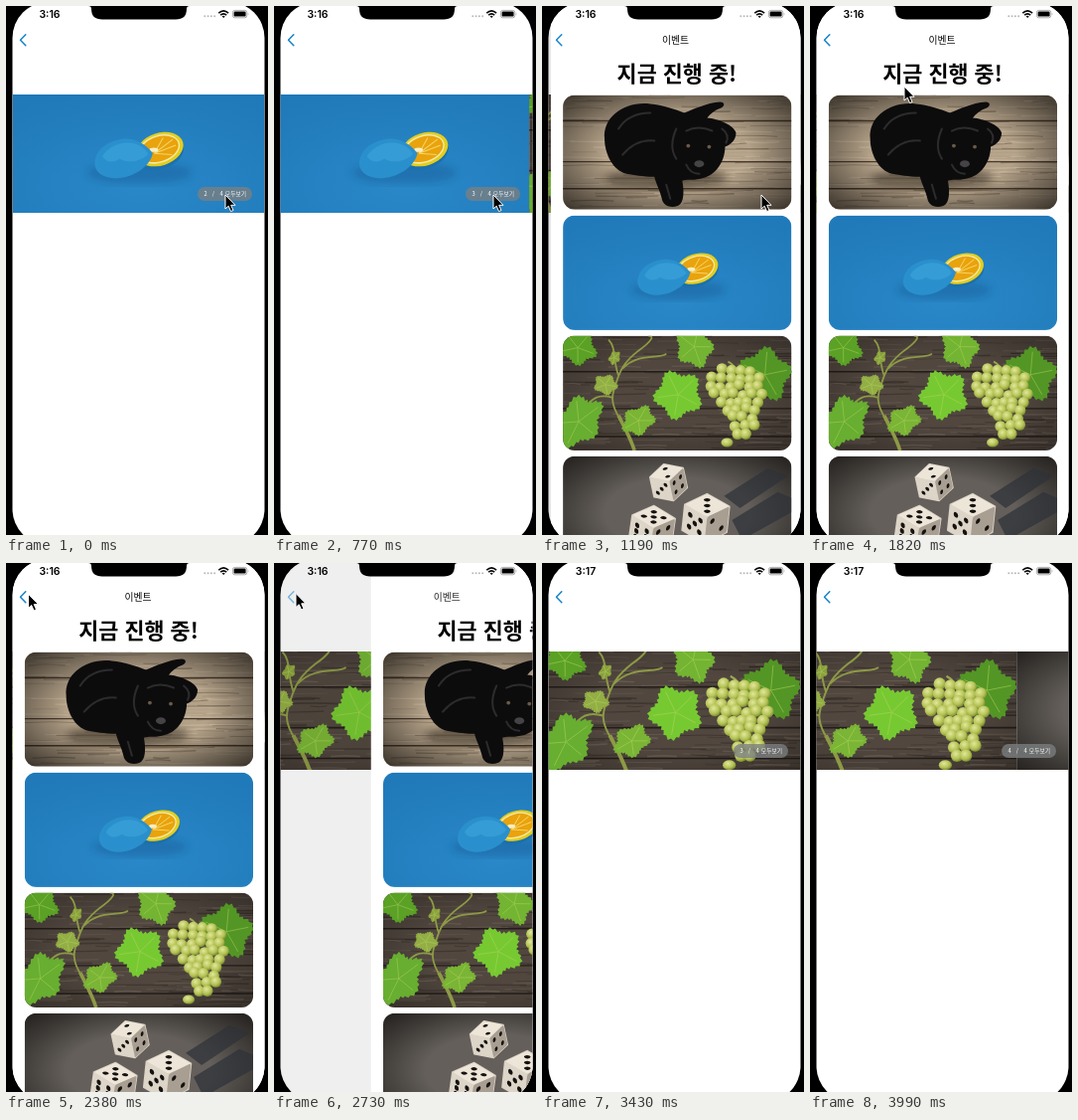
Animation of 264x532 px, one loop 4060 ms. Source, as an HTML page:

```html
<!DOCTYPE html>
<html lang="ko">
<head>
<meta charset="utf-8">
<title>Event carousel</title>
<style>
html, body { margin: 0; width: 100%; height: 100%; overflow: hidden; background: #000; }
svg { display: block; width: 100vw; height: 100vh; }
text { font-family: 'Noto Sans CJK KR', 'Noto Sans CJK', 'Noto Sans', sans-serif; text-anchor: middle; }
.clock { font: 600 10.5px Inter, sans-serif; }
</style>
</head>
<body>
<svg id="stage" viewBox="0 0 264 532" preserveAspectRatio="none"></svg>
<script>
const LOOP = 4060, STEP = 70, W = 254;
const stage = document.getElementById('stage');

let seed = 7;
const rnd = (a = 0, b = 1) => {
  seed = (seed * 16807) % 2147483647;
  return a + (b - a) * seed / 2147483647;
};
const repeat = (n, fn) => Array.from({ length: n }, (_, i) => fn(i)).join('');
const f1 = v => v.toFixed(1);

// Photo pieces, drawn in a 230 x 115 box
const photo = (id, body) => `<symbol id="${id}" viewBox="0 0 230 115" preserveAspectRatio="xMidYMid slice">${body}</symbol>`;

function wood(base, dark, light, gaps) {
  return `<rect width="230" height="115" fill="${base}"/>` +
    repeat(150, () => {
      const x = rnd(-30, 220), y = rnd(0, 115), l = rnd(15, 70);
      return `<path d="M${f1(x)} ${f1(y)}q${f1(l / 2)} ${f1(rnd(-2, 2))} ${f1(l)} 0" fill="none" stroke="${rnd() < .5 ? dark : light}" stroke-width="${f1(rnd(.4, 1.6))}" opacity=".38"/>`;
    }) +
    gaps.map(y => `<path d="M0 ${y}H230" stroke="${dark}" stroke-width="1.4"/>`).join('');
}

function leaf(x, y, sx, sy, rot, color) {
  const pts = repeat(60, i => {
    const a = i / 60 * Math.PI * 2;
    const r = .84 + .12 * Math.cos(5 * a) + (i % 2 ? .06 : -.03);
    return `${f1(sx * r * Math.cos(a))},${f1(sy * r * Math.sin(a))} `;
  });
  const veins = repeat(5, i => {
    const a = i * Math.PI * .4;
    return `M0 0L${f1(sx * .8 * Math.cos(a))} ${f1(sy * .8 * Math.sin(a))}`;
  });
  return `<g transform="translate(${x} ${y}) rotate(${rot})"><polygon points="${pts}" fill="${color}"/>
    <path d="${veins}" stroke="#b4d860" stroke-width=".7" opacity=".6"/></g>`;
}

function grapes() {
  const rows = [[160, 4], [151, 6], [149, 6], [152, 6], [158, 5], [165, 4], [170, 3], [173, 3], [175, 2]];
  return rows.map(([x, n], j) => repeat(n, i => {
    const cx = x + i * 9.4 + rnd(-1.5, 1.5), cy = 35 + j * 7.8 + rnd(-2, 2);
    return `<circle cx="${f1(cx)}" cy="${f1(cy)}" r="5.6" fill="url(#grape)"/>`;
  })).join('') + '<ellipse cx="165" cy="107" rx="6" ry="4.5" fill="url(#grape)"/>';
}

function die(x, y, s, rot, pips) {
  const A = [-.9, -.28], B = [.72, -.55], C = [.1, .95];
  const spots = {
    1: [[.5, .5]], 2: [[.27, .27], [.73, .73]], 3: [[.25, .25], [.5, .5], [.75, .75]],
    4: [[.27, .27], [.73, .27], [.27, .73], [.73, .73]]
  };
  spots[5] = [...spots[4], ...spots[1]];
  spots[6] = [...spots[4], [.27, .5], [.73, .5]];
  const face = (p, q, n, fill) => `<g transform="matrix(${p} ${q} 0 0)"><rect width="1.01" height="1.01" rx=".1" fill="${fill}"/>
    ${spots[n].map(([u, v]) => `<circle cx="${u}" cy="${v}" r=".1" fill="#15120f"/>`).join('')}</g>`;
  return `<g transform="translate(${x} ${y}) rotate(${rot}) scale(${s})">
    <path d="M-.9 -.28L-.18 -.83L.72 -.55L.82 .4L.1 .95L-.8 .67Z" fill="#d8d0c4" stroke="#d8d0c4" stroke-width=".08" stroke-linejoin="round"/>
    ${face(A, B, pips[0], '#ece5d8')}${face(A, C, pips[1], '#ddd5c8')}${face(B, C, pips[2], '#a89e92')}</g>`;
}

const dog = wood('#b3a188', '#4a3a2c', '#d9c9b0', [26, 67, 94]) + `
  <rect width="230" height="115" fill="url(#vignette)"/>
  <ellipse cx="104" cy="84" rx="62" ry="11" fill="#1d1610" opacity=".5" filter="url(#soft)"/>
  <path fill="#0d0c0d" d="M42 44C40 22 62 6 88 9C100 10 112 14 122 18C132 14 144 8 158 7C163 7 163 11 159 13C153 15 148 19 145 23C156 24 172 30 174 38C174 46 168 50 163 52C163 66 154 82 138 84C130 86 124 84 120 86C122 96 122 108 116 111C108 114 102 111 100 106C98 96 94 90 92 82C80 82 72 80 64 79C50 76 42 58 42 44Z"/>
  <path fill="none" stroke="#3a383b" stroke-width="2" stroke-linecap="round" opacity=".7" d="M56 34Q66 18 88 18M60 60Q74 44 92 46M114 34Q106 52 114 64M124 36Q136 30 150 36M160 34Q168 40 164 48M104 90L108 104M124 70Q128 79 137 79"/>
  <circle cx="126" cy="51" r="1.9" fill="#6b5a48"/><circle cx="147" cy="52" r="1.9" fill="#6b5a48"/>
  <ellipse cx="137" cy="69" rx="5" ry="3.5" fill="#454346"/>`;

const fruit = `
  <rect width="230" height="115" fill="url(#blue)"/>
  <ellipse cx="116" cy="75" rx="48" ry="10" fill="#125a94" opacity=".45" filter="url(#soft)"/>
  <ellipse cx="134" cy="57" rx="23" ry="14.5" transform="rotate(-18 134 57)" fill="#1c70ae"/>
  <g transform="translate(134.5 53.5) rotate(-18)">
    <ellipse rx="22" ry="14.8" fill="#e3cd1c"/>
    <ellipse cx="-.6" cy="-.4" rx="19.5" ry="12.6" fill="#f3eaa6"/>
    <ellipse cx="-.4" cy="-.4" rx="18" ry="11.2" fill="#e9a30c"/>
    <path d="M-6 2L15 1M-6 2L14 -5M-6 2L9 8M-6 2L6 -9" stroke="#f5d56a" stroke-width=".9"/>
  </g>
  <ellipse cx="129" cy="54" rx="4" ry="2" fill="#f8edc0"/>
  <path d="M75 66C76 53 88 45 103 44C112 44 121 48 128 57C126 69 110 80 93 80C82 79 75 74 75 66Z" fill="#2a90cd"/>
  <path d="M82 60C88 50 100 46 110 48C118 50 122 54 124 58C116 66 104 66 98 62C92 66 86 66 82 60Z" fill="#3ba2da" opacity=".7"/>`;

const vine = wood('#51473f', '#241e1a', '#83776b', [36, 73, 101]) + `
  <rect width="230" height="115" fill="url(#vignette)" opacity=".5"/>
  <path d="M72 115C68 102 62 92 56 80" fill="none" stroke="#8d9a45" stroke-width="3.6"/>
  <path d="M58 84C46 66 50 58 54 46C58 34 62 26 76 15C90 5 92 0 86 0M56 40C50 24 54 12 46 4M60 33C76 16 98 24 104 18M50 62C36 58 30 62 20 74M62 92Q72 90 78 84" fill="none" stroke="#8d9a45" stroke-width="1.8"/>
  ${leaf(15, 12, 21, 18, 20, '#5aa126')}${leaf(16, 86, 23, 31, 40, '#68ae30')}${leaf(132, 11, 23, 20, 70, '#73b433')}
  ${leaf(43, 49, 13, 11, 10, '#93ae45')}${leaf(76, 85, 19, 15, 150, '#7ab535')}${leaf(52, 22, 6, 8, 30, '#8aa03d')}
  ${leaf(203, 39, 29, 28, 60, '#539625')}${leaf(116, 59, 26, 26, 100, '#77c932')}
  <path d="M176 40Q174 30 166 26" fill="none" stroke="#9aa553" stroke-width="2"/>` + grapes();

const dice = `
  <rect width="230" height="115" fill="#645f5a"/>
  <rect width="230" height="115" fill="url(#vignette)"/>
  <path d="M162 40L206 12L226 20L178 52ZM170 64L216 36L230 42V56L180 84Z" fill="#2d3138" opacity=".7"/>
  ${die(107, 25, 21, -6, [2, 3, 4])}${die(91, 72, 26, 14, [5, 6, 4])}${die(145, 61, 27, 12, [3, 5, 2])}`;

const radial = (id, stops, extra = '') => `<radialGradient id="${id}" ${extra}>${stops.map(([o, c, a = 1]) =>
  `<stop offset="${o}" stop-color="${c}" stop-opacity="${a}"/>`).join('')}</radialGradient>`;

const panels = ['fruit', 'vine', 'dice'].map((id, i) =>
  `<use href="#${id}" x="${i * W}" y="89" width="${W}" height="119"/>`).join('');
const cards = ['dog', 'fruit', 'vine', 'dice'].map((id, i) =>
  `<g transform="translate(12.2 ${f1(89.4 + i * 121.1)})" clip-path="url(#card)"><use href="#${id}" width="230.4" height="115.4"/></g>`).join('');

stage.innerHTML = `
<defs>
  <clipPath id="screen"><rect x="6.5" y="-4" width="${W}" height="546" rx="36"/></clipPath>
  <clipPath id="card"><rect width="230.4" height="115.4" rx="12"/></clipPath>
  <filter id="soft"><feGaussianBlur stdDeviation="4"/></filter>
  ${radial('vignette', [[.45, '#000', 0], [1, '#0a0705', .72]], 'r=".7"')}
  ${radial('blue', [[0, '#2a88c8'], [1, '#2079b9']], 'cy=".75" r=".8"')}
  ${radial('grape', [[0, '#e2e89a'], [.65, '#b3c154'], [1, '#7d8f32']], 'cx=".4" cy=".35" r=".65"')}
  ${photo('dog', dog)}${photo('fruit', fruit)}${photo('vine', vine)}${photo('dice', dice)}
</defs>
<rect width="264" height="532"/>
<g clip-path="url(#screen)">
  <rect width="264" height="532" fill="#fff"/>
  <g id="home">
    <g id="strip">${panels}</g>
    <rect x="186.5" y="182" width="55" height="14" rx="7" fill="#7c7f80" fill-opacity=".78"/>
    <g font-size="5.8" fill="#fff">
      <text id="page" x="194.5" y="191.2">2</text><text x="202.5" y="191.2">/</text>
      <text x="210.5" y="191.2">4</text><text x="225" y="191.2">모두보기</text>
    </g>
  </g>
  <rect id="dim" width="264" height="532"/>
  <g id="list">
    <rect width="${W + 2}" height="532" fill="#fff"/>
    <text x="127" y="76" font-size="21.8" font-weight="700">지금 진행 중!</text>
    ${cards}
  </g>
  <text id="title" y="37.8" font-size="9.8" font-weight="500">이벤트</text>
  <path id="back" d="M19.8 28.8L14.5 34.3L19.8 39.8" fill="none" stroke="#1583c9" stroke-width="1.5" stroke-linecap="round" stroke-linejoin="round"/>
  <text id="clock" class="clock" x="44" y="12">3:16</text>
  <g fill="#b9b9b9">${repeat(4, i => `<circle cx="${200.3 + i * 3.3}" cy="10.3" r="1"/>`)}</g>
  <g fill="none" stroke="#000" stroke-width="1.6">
    <path d="M214.3 7.2Q219.2 2.6 224.1 7.2M216.2 9.2Q219.2 6.4 222.2 9.2"/>
  </g>
  <path d="M217.7 10.4Q219.2 9.2 220.7 10.4L219.2 12Z"/>
  <rect x="228.4" y="4.4" width="14.4" height="7.4" rx="2.2" fill="none" stroke="#999" stroke-width=".8"/>
  <rect x="229.6" y="5.6" width="12" height="5" rx="1.2"/><path d="M243.8 6.8Q245.2 8.1 243.8 9.4Z" fill="#999"/>
</g>
<path d="M83 0Q86 0 86 3Q86 13.5 97 13.5H171Q182 13.5 182 3Q182 0 185 0Z"/>
<path id="cursor" d="M0 0V14L3.2 11.2L5.6 16.6L8 15.5L5.7 10.3H10Z" stroke="#fff" stroke-width="1" stroke-linejoin="round"/>`;

const el = {};
for (const id of ['home', 'strip', 'page', 'dim', 'list', 'title', 'back', 'clock', 'cursor']) el[id] = document.getElementById(id);

const clamp = v => Math.min(1, Math.max(0, v));
const ease = (t, start, span) => (1 - Math.cos(Math.PI * clamp((t - start) / span))) / 2;
const decay = (t, start, rate) => Math.exp(-rate * (t - start) / 1000);
const move = (node, x, y = 0) => node.setAttribute('transform', `translate(${x.toFixed(2)} ${y.toFixed(2)})`);

// Share of the width by which the list is pushed off to the right
function away(t) {
  if (t < 820 || t > 3250) return 1;
  return t < 2688 ? decay(t, 820, 12.6) : 1 - decay(t, 2688, 10.6);
}

function pointer(t) {
  const path = [[1260, 221, 190], [1540, 117, 103], [1750, 117, 103], [1820, 95, 81], [2310, 23, 32], [2450, 22, 30.5]];
  const k = path.findIndex(p => t < p[0]);
  if (k === 0) return path[0].slice(1);
  if (k < 0) return path[path.length - 1].slice(1);
  const [t0, x0, y0] = path[k - 1], [t1, x1, y1] = path[k];
  const u = ease(t, t0, t1 - t0);
  return [x0 + (x1 - x0) * u, y0 + (y1 - y0) * u];
}

function draw(t) {
  const r = away(t);
  move(el.home, 6.5 - .3 * W * (1 - r));
  move(el.strip, -W * (ease(t, 748, 300) + ease(t, 3900, 300)));
  move(el.list, 6.5 + W * r);
  el.dim.setAttribute('opacity', .1 * (1 - r));
  el.title.setAttribute('x', 133 + r * (t < 2000 ? 153 : 115));
  el.title.setAttribute('opacity', 1 - r * r);
  el.back.setAttribute('opacity', 1 - 2 * r * (1 - r));
  el.page.textContent = t < 770 ? 2 : t < 3920 ? 3 : 4;
  el.clock.textContent = t < 3430 ? '3:16' : '3:17';
  move(el.cursor, ...pointer(t));
  el.cursor.setAttribute('visibility', t < 3150 ? 'visible' : 'hidden');
}

const begin = performance.now();
function tick() {
  const t = (performance.now() - begin) % LOOP;
  draw(Math.floor(t / STEP) * STEP);
  requestAnimationFrame(tick);
}
tick();
</script>
</body>
</html>
```
